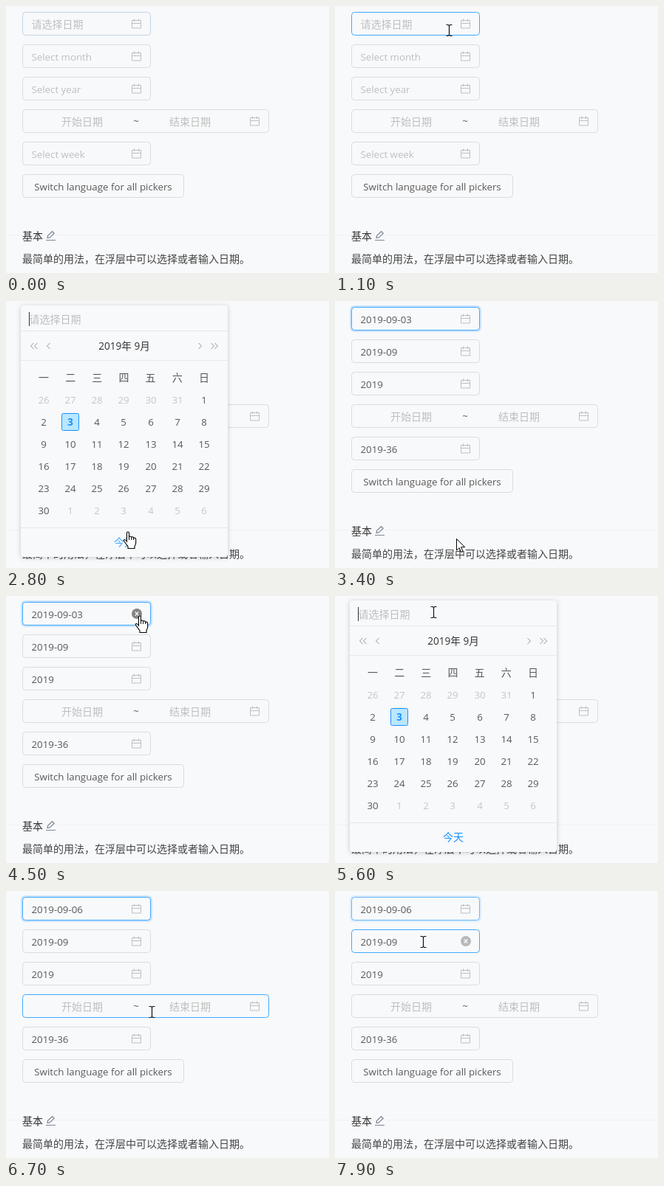
Animation, 437 px wide and 362 px high, one loop 8000 ms. Source, as an HTML page:

```html
<!DOCTYPE html>
<html lang="zh-CN">
<head>
<meta charset="utf-8">
<title>Date pickers</title>
<style>
html, body { margin: 0; width: 100%; height: 100%; overflow: hidden; background: #f8f9fb; }
svg { display: block; font: 13.3px "Open Sans", "Noto Sans CJK SC", "Noto Sans CJK", sans-serif; }
.zh { font-size: 14px; font-family: "Noto Sans CJK SC", "Noto Sans CJK", sans-serif; }
.mid { text-anchor: middle; }
</style>
</head>
<body>
<svg id="stage" width="437" height="362" viewBox="0 0 437 362"></svg>
<script>
const stage = document.getElementById('stage');
const BG = '#f8f9fb', TEXT = '#595959', PALE = '#bfbfbf', LINE = '#d9dce0', BLUE = '#1890ff', HOVER = '#40a9ff';

// Pointer positions: time in ms, x, y, kind (a arrow, i text beam, h hand)
const MOVES = [
  [600, 411, 45, 'a'], [700, 340, 42, 'a'], [800, 260, 38, 'a'], [900, 205, 34, 'a'],
  [1000, 168, 33, 'i'], [1100, 154, 33, 'i'],
  [2400, 155, 50, 'a'], [2500, 162, 85, 'a'], [2600, 170, 134, 'h'], [2700, 171, 230, 'h'],
  [2800, 165, 313, 'h'], [2900, 165, 318, 'h'], [3000, 164, 322, 'h'], [3400, 164, 322, 'a'],
  [3800, 164, 324, 'a'], [3900, 165, 300, 'a'], [4000, 167, 272, 'a'], [4100, 168, 203, 'i'],
  [4200, 173, 115, 'h'], [4300, 177, 72, 'h'], [4400, 180, 34, 'h'], [4500, 181, 27, 'h'],
  [4800, 181, 27, 'i'], [5000, 170, 26, 'i'], [5100, 152, 24, 'i'], [5200, 140, 23, 'i'], [5300, 133, 22, 'i'],
  [5900, 145, 50, 'a'], [6000, 168, 104, 'a'], [6100, 190, 158, 'h'], [6200, 197, 164, 'h'], [6600, 197, 164, 'i'],
  [7200, 190, 145, 'i'], [7300, 160, 105, 'i'], [7400, 130, 76, 'i'], [7500, 119, 69, 'i']
];

// Pickers: top, width, placeholder
const FIELDS = [[8, 174, '请选择日期'], [52, 174, 'Select month'], [96, 174, 'Select year'], [140, 334, ''], [184, 174, 'Select week']];

const within = (t, a, b) => t >= a && t < b;
const text = (x, y, s, fill = TEXT, cls = '', more = '') =>
  `<text x="${x}" y="${y}" fill="${fill}" class="${cls}" ${more}>${s}</text>`;
const path = (d, stroke, more = '') => `<path d="${d}" fill="none" stroke="${stroke}" ${more}/>`;
const box = (x, y, w, h, stroke, fill = BG, rx = 4) =>
  `<rect x="${x + .5}" y="${y + .5}" width="${w - 1}" height="${h - 1}" rx="${rx}" fill="${fill}" stroke="${stroke}"/>`;

function valuesAt(t) {
  if (within(t, 3200, 4800)) return ['2019-09-03', '2019-09', '2019', '', '2019-36'];
  if (t >= 6500) return ['2019-09-06', '2019-09', '2019', '', '2019-36'];
  return [];
}

function popupOpacity(t) {
  for (const [open, close] of [[1500, 3200], [5400, 6500]]) {
    if (within(t, open, close)) return Math.min(1, .35 + (t - open) / 200 * .65);
    if (within(t, close, close + 200)) return t < close + 100 ? .6 : .2;
  }
  return 0;
}

function fieldIcon(right, y, value, hovered, onIcon) {
  const x = right - 19, cy = y + 16;
  if (value && hovered)
    return `<circle cx="${x}" cy="${cy}" r="7" fill="${onIcon ? '#858585' : '#b8b8b8'}"/>` +
      path(`M${x - 2.3} ${cy - 2.6}l4.6 5.2m0-5.2l-4.6 5.2`, '#fff', 'stroke-width="1.3"');
  return path(`M${x - 6.5} ${cy - 4.5}h12v10.5h-12zm0 4h12M${x - 3.5} ${cy - 6.5}v3.5m6-3.5v3.5`, PALE);
}

function field(i, t, cursor, values, open) {
  const [y, w, hint] = FIELDS[i], value = values[i], right = 22 + w;
  const hovered = cursor && !open && cursor[1] >= 22 && cursor[1] < right && cursor[2] >= y && cursor[2] < y + 32;
  const focused = i === 0 && t >= 1500, fading = t >= 7900;
  let border = hovered || focused ? HOVER : LINE, out = '';
  if (i === 0 && t < 100) border = '#bfd5e8';
  if (focused) {
    if (fading) border = '#69b8f8';
    out += `<rect x="20" y="6" width="178" height="36" rx="6" fill="${BLUE}" opacity="${fading ? .12 : .2}"/>`;
  }
  out += box(22, y, w, 32, border);
  if (i === 3)
    out += text(103, 162, '开始日期', PALE, 'zh mid') + text(176, 161, '~', TEXT, 'mid') + text(249, 162, '结束日期', PALE, 'zh mid');
  else
    out += text(34.5, y + 22, value || hint, value ? TEXT : PALE, !value && i === 0 ? 'zh' : '');
  return out + fieldIcon(right, y, value, hovered, hovered && cursor[1] > 169);
}

function page(t, cursor, open) {
  const values = valuesAt(t);
  return path('M0 310.5H437', '#f0f1f4') +
    FIELDS.map((f, i) => field(i, t, cursor, values, open)).join('') +
    box(22, 228, 219, 32, LINE) + text(131.5, 250, 'Switch language for all pickers', TEXT, 'mid') +
    text(22, 317, '基本', '#333', 'zh') +
    path('M54 317.5h13M56 314.5l.6-3.2 6-5.6 2.6 2.6-6 5.6z', '#7d8894', 'stroke-width="1.2"') +
    text(22, 348, '最简单的用法，在浮层中可以选择或者输入日期。', '#444', 'zh');
}

function calendar(t, cursor) {
  let out = '';
  [...'一二三四五六日'].forEach((d, i) => out += text(51 + 36.15 * i, 109, d, TEXT, 'zh mid'));
  for (let n = 0; n < 42; n++) {
    const cx = Math.round(51 + n % 7 * 36.15), cy = 134 + 30 * Math.floor(n / 7);
    const day = n - 5, inMonth = day > 0 && day < 31;
    const hovered = cursor && Math.abs(cursor[1] - cx) < 12 && Math.abs(cursor[2] - cy) < 12;
    const pressed = hovered && t >= 6400, today = day === 3;
    if (today) out += box(cx - 12, cy - 12, 24, 24, BLUE, '#bae7ff', 2);
    else if (hovered) out += `<rect x="${cx - 12}" y="${cy - 12}" width="24" height="24" rx="2" fill="${pressed ? '#8fcfff' : '#e6f7ff'}"/>`;
    const fill = today ? BLUE : pressed ? '#fff' : inMonth ? TEXT : '#c6c6c6';
    out += text(cx, cy + 5, day < 1 ? day + 31 : day > 30 ? day - 30 : day, fill, 'mid', today ? 'font-weight="700"' : '');
  }
  return out;
}

function popup(t, cursor, opacity) {
  const caret = within(t, 1600, 2100) || within(t, 2600, 3200) || within(t, 5400, 5900);
  const onToday = cursor && cursor[2] > 308 && t < 3400;
  const sy = .8 + .2 * opacity;
  const left = x => `M${x} 57l-4 4 4 4`, right = x => `M${x} 57l4 4-4 4`;
  return `<g opacity="${opacity}" transform="translate(0 ${6 * (1 - sy)}) scale(1 ${sy})">` +
    `<rect x="20" y="6" width="280" height="341" rx="4" fill="${BG}" style="filter:drop-shadow(0 1px 3px rgba(0,0,0,.2))"/>` +
    path('M20 40.5h280M20 80.5h280M20 307.5h280', '#e6e8eb') +
    text(31.5, 30, '请选择日期', PALE, 'zh') + (caret ? path('M31.5 15v19', '#333') : '') +
    path(left(37.5) + left(42.5) + left(59.5) + right(260.5) + right(277.5) + right(282.5), '#929292') +
    text(160, 66, '2019年 9月', '#333', 'mid', 'font-size="13.6" font-weight="500"') +
    calendar(t, cursor) +
    text(160, 332, '今天', onToday ? HOVER : BLUE, 'zh mid') + '</g>';
}

function pointer([, x, y, kind]) {
  const shapes = {
    a: '<path d="M.5.5V16l3.7-3.4 2.5 5.9 2.4-1-2.5-5.8h5z" fill="#fff" stroke="#000"/>',
    i: path('M-3.5-7.5h2.5L.5-6.5 2-7.5h2.5M-3.5 7.5h2.5L.5 6.5 2 7.5h2.5M.5-6.5v13', '#111', 'stroke-width="1.2"'),
    h: '<path d="M-1.5 1.5Q-1.5 0 0 0T1.5 1.5V7Q1.5 6 3 6T4.5 7.5Q5 6.5 6.3 6.8T7.7 8.5Q8.5 7.7 9.5 8.2T10.7 10V15Q10.7 17 9 19.5V22.5H0V20L-5 13Q-6.5 10.5-4.5 10.5-3 10.5-1.5 13z" fill="#fff" stroke="#000" stroke-width="1.1"/>' +
      path('M1.5 7v4M4.5 7.5V11M7.7 8.5V11', '#000')
  };
  return `<g transform="translate(${x} ${y})">${shapes[kind]}</g>`;
}

function scene(t) {
  const cursor = MOVES.filter(m => m[0] <= t).pop();
  const opacity = popupOpacity(t);
  return page(t, cursor, opacity > .5) + (opacity ? popup(t, cursor, opacity) : '') + (cursor ? pointer(cursor) : '');
}

let shown = -1;
function tick() {
  const t = Math.floor(performance.now() % 8000 / 100) * 100;
  if (t !== shown) stage.innerHTML = scene(shown = t);
  requestAnimationFrame(tick);
}
tick();
</script>
</body>
</html>
```
